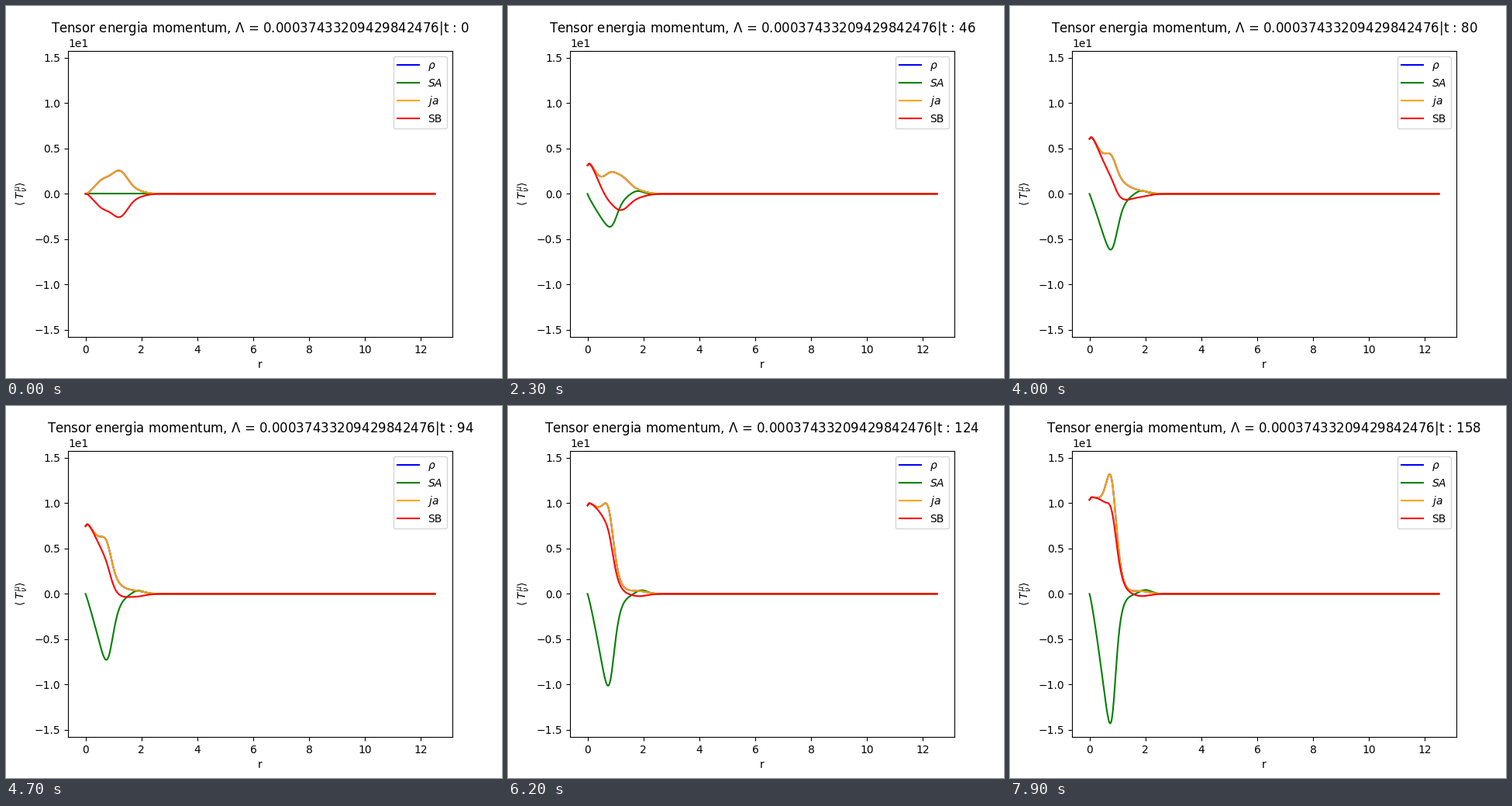
A matplotlib script for the animation above (8000 ms loop, 640 by 480 pixels).

```python
import numpy as np
import matplotlib.pyplot as plt
from matplotlib.animation import FuncAnimation

FRAMES, INTERVAL = 80, 100
LAMBDA = "0.00037433209429842476"

r = np.linspace(0, 12.5, 626)


def bell(x, mid, width):
    return np.exp(-((x - mid) / width) ** 2)


def rise(n, mid, width):
    return 1 / (1 + np.exp(-(n - mid) / width))


def edge(radius, power):
    """Plateau of height 1 that falls off around the given radius."""
    return 1 / (1 + (r / radius) ** power)


def core(n):
    """Growing central plateau; its edge breathes in and out."""
    breath = np.cos(2 * np.pi * (n - 22) / 60)
    x = n / 32.5
    spike = 3.1 * x**1.6 * np.exp(0.8 * (1 - x**2))
    height = (10.75 * rise(n, 46.8, 9.3)
              + spike * bell(r, 0, 0.39)
              + 2 * rise(n, 70, 5.5) * bell(r, 0.77, 0.2))
    dip = 0.3 * np.tanh(n / 10) * bell(r, 0, 0.04)
    return height * edge(0.965 + 0.042 * breath, 8.8 + 0.75 * breath) - dip


def shell(n):
    """Fading outer shell, persistent inner shell and a static tail."""
    outer = 2.45 * bell(n, 0, 37.5) * bell(r, 1.22, 0.42)
    size = 1 + 0.35 * np.exp(-n / 8) + 0.85 * rise(n, 68, 6)
    mid = 0.765 - 0.165 * np.exp(-n / 10) + 0.06 * bell(n, 32, 10)
    inner = size * bell(r, mid, 0.38 - 0.0017 * n)
    tail = 0.27 * bell(r, 1.85, 0.4)
    return (outer + inner + tail) * (1 - bell(r, 0, 0.12))


def flux(n):
    """Inward flux: a power-law ramp cut off at the core, plus outgoing tail."""
    ramp = (0.185 * n + 0.00135 * n**2) * r ** (1.2 - np.exp(-n / 20))
    cut = edge(0.905 + 0.19 * bell(n, 0, 35), 8 + ((n - 40) / 27) ** 2)
    tail = 0.45 * (1 - np.exp(-n / 12)) * bell(r, 1.68 + 0.004 * n, 0.3)
    return tail - ramp * cut


fig, ax = plt.subplots(figsize=(6.4, 4.8), dpi=100)
styles = [("blue", r"$\rho$"), ("green", "$SA$"), ("orange", "$ja$"), ("red", "SB")]
lines = [ax.plot(r, 0 * r, color=c, label=name)[0] for c, name in styles]
ax.set_ylim(-15.8, 15.8)
ax.ticklabel_format(axis="y", style="sci", scilimits=(0, 0))
ax.set_xlabel("r")
ax.set_ylabel(r"$\langle\ T^{\mu}_{\nu} \rangle$")
ax.legend(loc="upper right")


def update(n):
    a = core(n) if n else 0 * r
    b = shell(n)
    for line, y in zip(lines, (a + b, flux(n), a + b, a - b)):
        line.set_ydata(y)
    ax.set_title(rf"Tensor energia momentum, $\Lambda$ = {LAMBDA}|t : {2 * n}")
    return lines


anim = FuncAnimation(fig, update, frames=FRAMES, interval=INTERVAL,
                     repeat=True, repeat_delay=0, blit=False)
plt.show()
```
